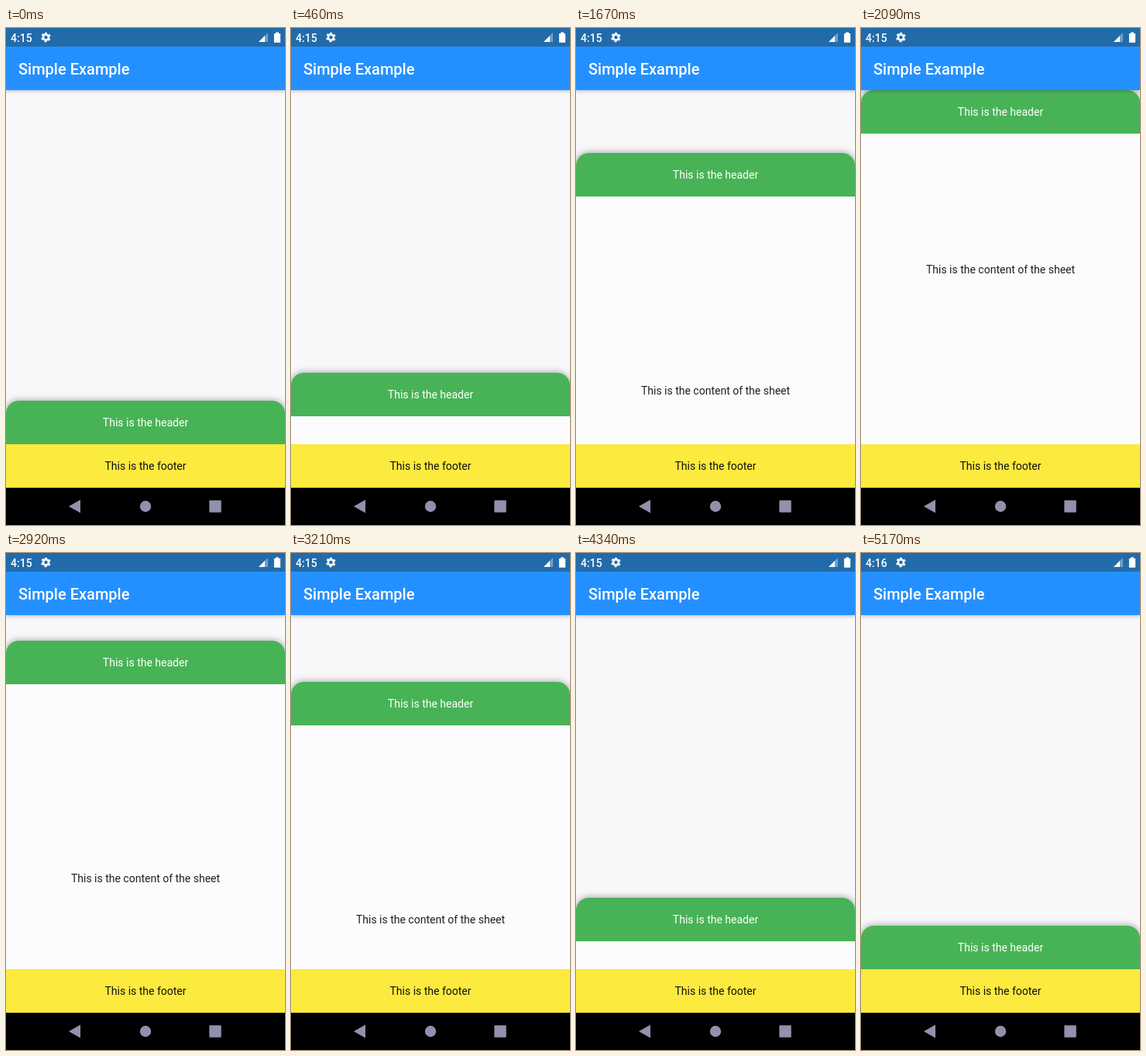
Recreate the animation shown at these times as an HTML page. Size 360 px wide and 640 px high, loop 5210 ms.

```html
<!DOCTYPE html>
<html lang="en">
<head>
<meta charset="utf-8">
<title>Simple Example</title>
<style>
  html, body { margin: 0; width: 100%; height: 100%; overflow: hidden; }
  body { position: relative; background: #f8f8fb; font: 14px/56px Roboto, sans-serif; text-align: center; }
  body > *, #sheet > * { position: absolute; left: 0; width: 360px; }
  #stage { top: 80px; height: 512px; overflow: hidden; }
  #sheet { position: absolute; top: 0; left: 0; width: 360px; height: 600px; background: #fcfcff;
    border-radius: 16px 16px 0 0; box-shadow: 0 0 10px rgba(0, 0, 0, .4); }
  #content { top: 56px; height: 500px; line-height: 500px; color: #202020; }
  #header { top: 0; height: 56px; background: #48b356; color: #fff; border-radius: 16px 16px 0 0; }
  #footer { top: 536px; height: 56px; background: #fdea3f; color: #111; }
  #bar { top: 24px; height: 56px; background: #2490ff; color: #fff; box-shadow: 0 2px 4px rgba(0, 0, 0, .2); }
  #bar span { position: absolute; left: 16px; top: 1px; font-size: 20px; font-weight: 500; }
  #status { top: 0; height: 24px; background: #226bab; color: #fff; }
  #clock { position: absolute; left: 6px; top: 1px; font-weight: 500; line-height: 24px; }
  #status svg { position: absolute; left: 0; top: 0; }
  #nav { top: 592px; height: 48px; background: #000; }
  #nav svg { display: block; }
</style>
</head>
<body>
<div id="stage">
  <div id="sheet">
    <div id="content">This is the content of the sheet</div>
    <div id="header">This is the header</div>
  </div>
</div>
<div id="footer">This is the footer</div>
<div id="bar"><span>Simple Example</span></div>
<div id="status">
  <span id="clock">4:15</span>
  <svg width="360" height="24" fill="#fff">
    <g fill="none" stroke="#fff" transform="rotate(-105 51.5 12)">
      <circle cx="51.5" cy="12" r="3.5" stroke-width="2.6"/>
      <circle cx="51.5" cy="12" r="5.3" stroke-width="2" stroke-dasharray="2.8 2.75"/>
    </g>
    <path d="M338 6V18H326Z" opacity=".35"/>
    <path d="M334 10V18H326Z"/>
    <path d="M348 5.5h4V7h2.1V18.7h-8.2V7H348Z"/>
  </svg>
</div>
<div id="nav">
  <svg width="360" height="48" fill="#9191ad">
    <path d="M81 24L96 15.5V32.5Z"/>
    <circle cx="180" cy="24" r="7.2"/>
    <rect x="262.3" y="16.3" width="15.4" height="15.4" rx="1"/>
  </svg>
</div>
<script>
  const LOOP = 5210, STEP = LOOP / 125, TRAVEL = 400, CLOCK_TURN = 4750;

  // [ms, px pulled up]; beyond TRAVEL the content scrolls
  const drag = [
    [0, 0], [840, 94], [1670, 319], [2090, 475], [2280, 500], [2400, 500],
    [2920, 367], [3450, 291], [3800, 288], [3960, 288], [4340, 36], [4540, 0], [LOOP, 0]
  ];

  const secant = i => (drag[i + 1][1] - drag[i][1]) / (drag[i + 1][0] - drag[i][0]);

  // Harmonic mean of neighbouring slopes keeps the curve monotone
  const slopes = drag.map((_, i) => {
    if (i === 0 || i === drag.length - 1) return 0;
    const a = secant(i - 1), b = secant(i);
    return a * b > 0 ? 2 * a * b / (a + b) : 0;
  });

  function pull(t) {
    let i = 0;
    while (i < drag.length - 2 && t >= drag[i + 1][0]) i++;
    const [t0, p0] = drag[i], [t1, p1] = drag[i + 1];
    const h = t1 - t0, u = Math.min(1, (t - t0) / h), v = 1 - u;
    return p0 * v * v * (1 + 2 * u) + p1 * u * u * (3 - 2 * u)
      + h * u * v * (slopes[i] * v - slopes[i + 1] * u);
  }

  const [sheet, content, clock] = ['sheet', 'content', 'clock'].map(id => document.getElementById(id));
  const shift = (el, y) => { el.style.transform = `translateY(${y}px)`; };

  function draw(t) {
    const tick = Math.ceil(Math.floor(t / STEP) * STEP / 10) * 10;
    const p = Math.round(pull(tick));
    shift(sheet, TRAVEL - Math.min(p, TRAVEL));
    shift(content, -Math.max(0, p - TRAVEL));
    clock.textContent = tick < CLOCK_TURN ? '4:15' : '4:16';
  }

  const start = performance.now();
  function loop() {
    draw((performance.now() - start) % LOOP);
    requestAnimationFrame(loop);
  }
  loop();
</script>
</body>
</html>
```
